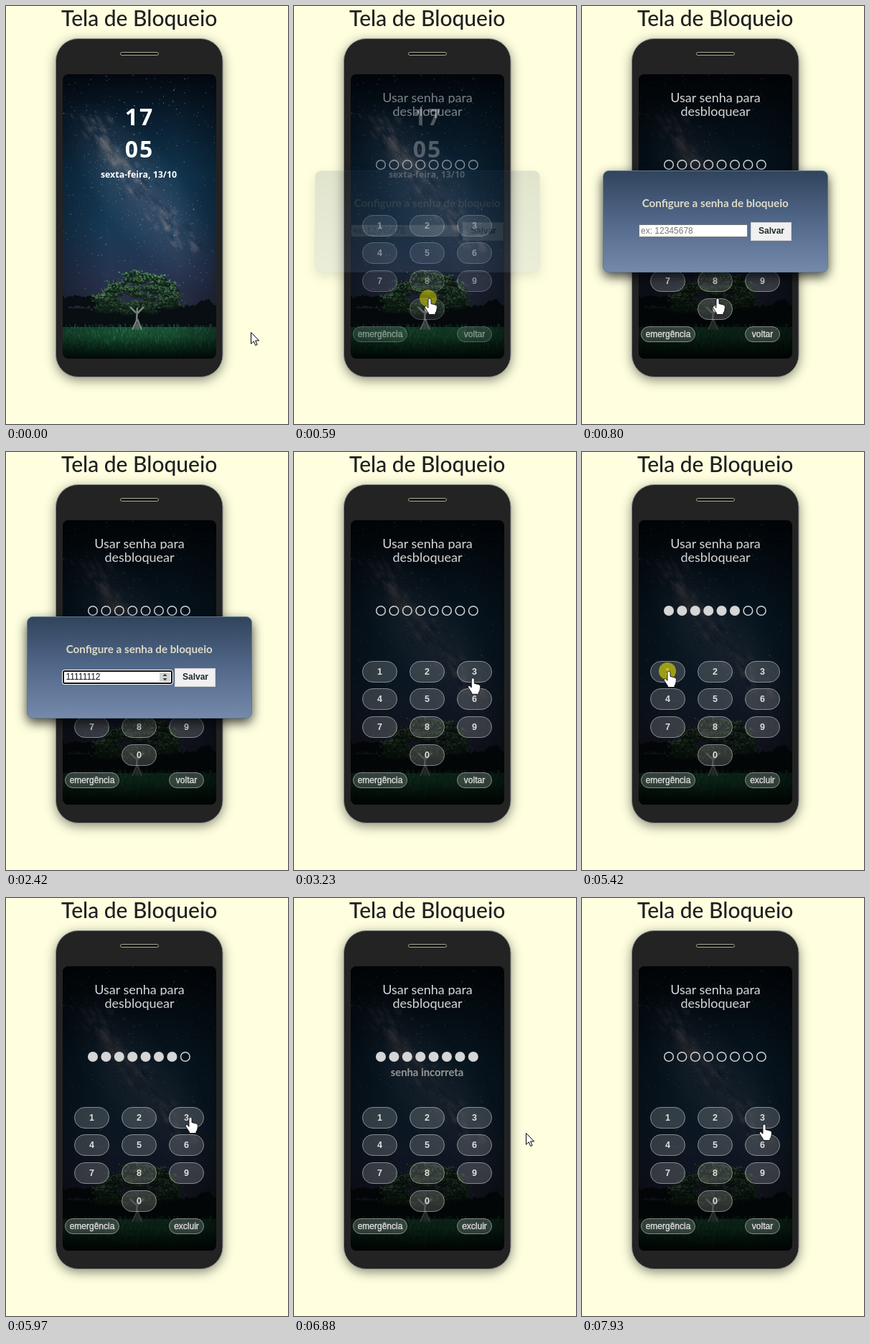
An HTML page with a canvas for the animation above (8000 ms loop, 393 by 582 pixels).

```html
<!DOCTYPE html>
<html lang="pt">
<head>
<meta charset="utf-8">
<title>Tela de Bloqueio</title>
<style>
html, body { margin: 0; width: 100%; height: 100%; overflow: hidden; background: #ffffe0; }
canvas, svg { position: absolute; left: 0; top: 0; }
#photo { left: 79px; top: 95px; border-radius: 8px; }
text { text-anchor: middle; white-space: pre; }
.lato { font-family: Lato, sans-serif; }
.noto { font-family: "Noto Sans", sans-serif; font-weight: 600; fill: #fff; }
.arial { font-family: "Liberation Sans", Arial, sans-serif; }
.bold { font-weight: 700; }
.medium { font-weight: 500; }
.sturdy { stroke: #dedede; stroke-width: .35px; }
.left { text-anchor: start; }
.key { stroke: rgba(255,255,255,.45); }
</style>
</head>
<body>
<svg id="base" width="393" height="582"></svg>
<canvas id="photo" width="214" height="396"></canvas>
<svg id="ui" width="393" height="582"></svg>
<script>
const LOOP = 8000;
const base = document.getElementById('base');
const ui = document.getElementById('ui');

function add(parent, tag, attrs = {}, content) {
  const node = document.createElementNS('http://www.w3.org/2000/svg', tag);
  for (const name in attrs) node.setAttribute(name, attrs[name]);
  if (content !== undefined) node.textContent = content;
  parent.appendChild(node);
  return node;
}
const rect = (parent, x, y, width, height, rx, attrs) =>
  add(parent, 'rect', { x, y, width, height, rx, ...attrs });
const label = (parent, x, y, content, cls, size, fill) =>
  add(parent, 'text', { x, y, class: cls, style: `font-size:${size}px;fill:${fill}` }, content);
const show = (node, on) => { node.style.display = on ? '' : 'none'; };
const ramp = (t, from, to) => Math.min(1, Math.max(0, (t - from) / (to - from)));
const smooth = p => p * p * (3 - 2 * p);

function gradient(parent, id, stops) {
  const g = add(parent, 'linearGradient', { id, x1: 0, y1: 0, x2: 0, y2: 1 });
  stops.forEach((color, i) =>
    add(g, 'stop', { offset: i / (stops.length - 1), 'stop-color': color }));
}

// Phone body
label(base, 185.7, 28, 'Tela de Bloqueio', 'lato medium', 30, '#212121');
rect(base, 69.5, 45.5, 232.5, 471, 31, {
  fill: '#232323', stroke: '#858a86',
  style: 'filter:drop-shadow(0 4px 8px rgba(0,0,0,.45))'
});
rect(base, 159.5, 64.5, 53, 4, 2, { fill: '#151515', stroke: '#aaa993' });

// Night landscape
function paintPhoto() {
  const c = document.getElementById('photo').getContext('2d');
  let seed = 17;
  const rnd = () => (seed = (seed * 16807) % 2147483647) / 2147483647;
  const spread = () => rnd() + rnd() + rnd() - 1.5;
  const fillBox = (style, x, y, w, h) => { c.fillStyle = style; c.fillRect(x, y, w, h); };
  const blend = (g, stops) => { stops.forEach(([p, color]) => g.addColorStop(p, color)); return g; };
  const vertical = (y0, y1, stops) => blend(c.createLinearGradient(0, y0, 0, y1), stops);
  const blob = (x, y, rx, ry, angle, color) => {
    c.fillStyle = color;
    c.beginPath();
    c.ellipse(x, y, rx, ry, angle, 0, 7);
    c.fill();
  };
  c.translate(-79, -95);

  fillBox(vertical(95, 445, [[0, '#03080f'], [.16, '#091c2c'], [.4, '#10354f'],
    [.62, '#183a56'], [.8, '#273450'], [1, '#29283a']]), 79, 95, 214, 396);

  // Milky way: soft glow, then clumps of light and dust
  const glow = (x, y, rx, ry, rgb, alpha) => {
    c.save();
    c.translate(x, y);
    c.rotate(.9);
    c.scale(rx, ry);
    c.fillStyle = blend(c.createRadialGradient(0, 0, 0, 0, 0, 1),
      [[0, `rgba(${rgb},${alpha})`], [1, `rgba(${rgb},0)`]]);
    c.fillRect(-1, -1, 2, 2);
    c.restore();
  };
  glow(190, 262, 160, 60, '105,108,132', .42);
  glow(147, 210, 38, 17, '150,140,120', .3);
  for (let i = 0; i < 130; i++) {
    const k = rnd();
    glow(112 + 140 * k + spread() * 20, 158 + 175 * k + spread() * 16, 4 + rnd() * 11, 2 + rnd() * 5,
      rnd() < .45 ? '12,28,46' : '150,142,148', .24);
  }

  const star = (x, y, light) => {
    const size = rnd() < .08 ? 1.5 : 1;
    fillBox(`rgba(190,210,230,${light})`, x, y, size, size);
  };
  for (let i = 0; i < 900; i++) {
    const k = rnd();
    star(112 + 145 * k + spread() * 45, 158 + 180 * k + spread() * 35, .05 + .4 * rnd() ** 3);
  }
  for (let i = 0; i < 900; i++)
    star(79 + rnd() * 214, 95 + rnd() * 300, .05 + .7 * rnd() ** 4);
  fillBox(blend(c.createLinearGradient(79, 0, 293, 0),
    [[0, 'rgba(0,5,12,.35)'], [.3, 'rgba(0,5,12,0)'], [.75, 'rgba(0,5,12,0)'], [1, 'rgba(0,5,12,.35)']]),
    79, 95, 214, 350);

  // Tree line and meadow
  for (let x = 75; x < 298; x += 3) {
    const top = x < 130 ? 403 : x > 268 && x < 288 ? 408 : 416;
    blob(x, top + 6 + rnd() * 6, 4, 7, 0, '#080e12');
  }
  fillBox('#080e12', 79, 421, 214, 30);
  fillBox(vertical(446, 491, [[0, '#1b5138'], [.3, '#164a2e'], [.6, '#0a2618'], [1, '#020907']]),
    79, 447, 214, 44);
  for (let i = 0; i < 1500; i++) {
    const k = rnd();
    const light = .4 + .9 * rnd();
    fillBox(`rgba(${40 * light | 0},${108 * light | 0},${72 * light | 0},${.7 * (1 - k) ** 1.3})`,
      79 + rnd() * 214, 442 + k * 46, 1, 2 + rnd() * 4);
  }
  fillBox(blend(c.createLinearGradient(79, 0, 293, 0),
    [[0, 'rgba(0,8,8,.3)'], [.35, 'rgba(0,8,8,0)'], [.7, 'rgba(0,8,8,0)'], [1, 'rgba(0,8,8,.4)']]),
    79, 442, 214, 49);

  // Crown built from flat clumps, lit from above
  for (let i = 0; i < 85; i++) {
    const u = rnd() * 2 - 1;
    const k = rnd();
    const cx = 182 + 52 * u;
    const top = 370 + (u < 0 ? 36 : 20) * u * u;
    const cy = top + k * (428 - 8 * Math.abs(u) - top);
    blob(cx, cy + 2, 10, 4, .3 * u, 'rgba(14,32,24,.7)');
    for (let j = 0; j < 20; j++) {
      const dy = spread() * 4;
      const light = (1.1 - .5 * k) * (.65 - dy * .07 + .45 * rnd());
      blob(cx + spread() * 13, cy + dy, .6 + rnd() * 1.3, .5 + rnd() * .7, rnd() - .5,
        `rgb(${72 * light | 0},${118 * light | 0},${74 * light | 0})`);
    }
  }
  c.strokeStyle = '#77837a';
  c.lineWidth = 2.5;
  c.stroke(new Path2D('M183 420l-1 18-6 13M183 436l6 15M183 428l9-9M181 427l-8-8'));
  blob(183, 446, 3, 5, 0, '#55625a');
}
paintPhoto();

// Clock face
const clock = add(ui, 'g');
for (const [y, digits] of [[166, '17'], [211, '05']])
  add(clock, 'text', { x: 186, y, class: 'noto', style: 'font-size:32px;letter-spacing:2px' }, digits);
label(clock, 185, 239, 'sexta-feira, 13/10', 'noto', 12.4, '#fff');

// Keypad
const pad = add(ui, 'g');
const defs = add(ui, 'defs');
gradient(defs, 'panel', ['#31445c', '#52688a', '#758aab']);
rect(pad, 79, 95, 214, 396, 8, { fill: 'rgba(0,0,0,.6)' });
[['Usar senha para', 134, 116], ['desbloquear', 153, 136.5]].forEach(([words, y, top], i) => {
  rect(add(defs, 'clipPath', { id: 'line' + i }), 79, top, 214, 19.5, 0);
  label(pad, 186, y, words, 'lato', 18, '#d6d6d6').setAttribute('clip-path', `url(#line${i})`);
});

const pinRow = add(pad, 'g', { stroke: '#d2d4d5', 'stroke-width': 1.5 });
const pins = Array.from({ length: 8 }, (_, i) =>
  add(pinRow, 'circle', { cx: 121 + i * 18.4, cy: 221, r: 6.3 }));
const wrong = label(pad, 185.5, 248, 'senha incorreta', 'lato bold', 14.8, '#969899');

const IDLE = 'rgba(255,255,255,.17)';
const ACTIVE = 'rgba(255,255,255,.42)';
const keys = [1, 2, 3, 4, 5, 6, 7, 8, 9, 0].map((digit, i) => {
  const x = 95 + 66 * (digit ? i % 3 : 1);
  const y = 291 + Math.floor(38.7 * Math.floor(i / 3));
  const key = rect(pad, x + .5, y + .5, 48, 29, 14.5, { class: 'key', fill: IDLE });
  label(pad, x + 24.5, y + 19, digit, 'arial bold', 12.5, '#dedede');
  return key;
});
const pill = (x, width, content) => {
  rect(pad, x, 446.5, width, 21, 10.5, { class: 'key', fill: IDLE });
  return label(pad, x + width / 2, 461, content, 'arial sturdy', 12, '#dedede');
};
pill(82.5, 75, 'emergência');
const back = pill(227.5, 48, 'voltar');

// Password dialog
const dialog = add(ui, 'g');
rect(dialog, 29.5, 229.5, 313, 141, 8, {
  fill: 'url(#panel)', stroke: '#5e7b97',
  style: 'filter:drop-shadow(0 6px 8px rgba(0,0,0,.75))'
});
label(dialog, 185.7, 280, 'Configure a senha de bloqueio', 'lato bold', 15.2, '#dddcc8');
rect(dialog, 79.5, 304.5, 151, 17, 0, { fill: '#fff', stroke: '#777' });
const focus = add(dialog, 'g');
rect(focus, 78.5, 303.5, 154, 20, 3, { fill: '#fff', stroke: '#fff' });
rect(focus, 80, 305, 151, 17, 2, { fill: '#fff', stroke: '#101010', 'stroke-width': 2 });
rect(focus, 214, 307, 15, 13, 0, { fill: '#d4d4d4' });
add(focus, 'path', { d: 'M218.5 312l3-3.5 3 3.5zM218.5 315l3 3.5 3-3.5z', fill: '#404040' });
const hint = label(dialog, 82, 317, 'ex: 12345678', 'arial left', 12, '#777');
const typed = label(dialog, 83.5, 317, '', 'arial left', 12, '#111');
rect(dialog, 235.5, 301.5, 56, 25, 0, { fill: '#f0f0f0', stroke: '#d2d2d2' });
label(dialog, 264, 317, 'Salvar', 'arial bold', 12, '#1d2b2b');

// Pointer
const flash = add(ui, 'circle', { r: 12, fill: 'rgba(210,205,0,.68)' });
const pointer = add(ui, 'g', { stroke: '#000', 'stroke-linejoin': 'round' });
const shapes = {
  arrow: 'M.5.5v15.8l3.7-3.5 2.5 5.7 2.4-1-2.5-5.6h5z',
  hand: 'M-2 2a2 2 0 0 1 4 0V7.5l6 1.5q2.5.6 2.5 3l-.8 5q-.5 2-1.7 3v2.5h-9q-.8-3-3-5.5l-2.8-4.5q0-2 2-2l2.8 2.8z',
  beam: 'M-3-8h6M0-8v16M-3 8h6'
};
for (const name in shapes)
  shapes[name] = add(pointer, 'path', { d: shapes[name], fill: '#fff', 'stroke-width': name === 'hand' ? .8 : 1 });

const track = [
  [70, 341, 454], [430, 189, 407], [900, 189, 407], [1300, 150, 313], [2480, 150, 313],
  [2740, 253, 315], [3200, 253, 315], [3510, 121, 305], [5640, 121, 305], [5970, 257, 305],
  [6470, 257, 305], [6740, 323, 327], [7700, 323, 327], [7920, 254, 315]
];
const shapeTimes = [
  [0, 'arrow'], [500, 'hand'], [950, 'arrow'], [1150, 'beam'], [1750, ''], [2480, 'beam'],
  [2600, 'arrow'], [2680, 'hand'], [6550, 'arrow'], [7850, 'hand']
];
const presses = [3700, 3900, 4100, 4330, 4590, 5080, 5410, 6270];
const otherClicks = [440, 1350, 2750];
const shake = [0, -1.5, 3, -6, 6, -6, 6, -6, 3, -1.5, 0];

function pointerAt(t) {
  const i = track.findIndex(step => step[0] > t);
  if (i === 0) return track[0].slice(1);
  if (i < 0) return track[track.length - 1].slice(1);
  const [t0, x0, y0] = track[i - 1];
  const [t1, x1, y1] = track[i];
  const p = smooth(ramp(t, t0, t1));
  return [x0 + (x1 - x0) * p, y0 + (y1 - y0) * p];
}

function typedAt(t) {
  if (t < 1750) return '';
  const repeats = t < 2150 ? 0 : Math.min(6, 1 + Math.floor((t - 2150) / 33));
  return '1'.repeat(1 + repeats) + (t < 2400 ? '' : '2');
}

function render(t) {
  const padIn = ramp(t, 480, 680);
  clock.style.opacity = 1 - padIn;
  pad.style.opacity = padIn;
  dialog.style.opacity = ramp(t, 560, 780);
  show(dialog, t > 560 && t < 2950);
  show(focus, t >= 1350 && t < 2820);
  show(hint, t < 1750);
  typed.textContent = typedAt(t);

  const cleared = t >= 7720;
  const filled = cleared ? 0 : presses.filter(p => t >= p + 140).length;
  pins.forEach((pin, i) => pin.setAttribute('fill', i < filled ? '#d6d6d6' : 'none'));
  back.textContent = filled ? 'excluir' : 'voltar';
  wrong.style.opacity = cleared ? 0 : ramp(t, 6450, 6740);

  const s = ramp(t, 6880, 7700) * 10;
  const n = Math.min(9, Math.floor(s));
  const shift = shake[n] + (shake[n + 1] - shake[n]) * smooth(s - n);
  pinRow.setAttribute('transform', `translate(${shift})`);

  const active = presses.findIndex(p => t >= p + 70 && t < p + 140);
  keys[0].setAttribute('fill', active >= 0 && active < 7 ? ACTIVE : IDLE);
  keys[2].setAttribute('fill', active === 7 ? ACTIVE : IDLE);

  const [x, y] = pointerAt(t);
  pointer.setAttribute('transform', `translate(${x} ${y})`);
  const shape = shapeTimes.filter(step => step[0] <= t).pop()[1];
  for (const name in shapes) show(shapes[name], name === shape);
  const click = [...presses, ...otherClicks].find(p => t >= p && t < p + 200);
  show(flash, click !== undefined);
  if (click !== undefined) {
    flash.setAttribute('cx', x - 2);
    flash.setAttribute('cy', y);
    flash.style.opacity = 1 - ramp(t, click + 140, click + 200);
  }
}

const start = performance.now();
function tick() {
  render((performance.now() - start) % LOOP);
  requestAnimationFrame(tick);
}
tick();
</script>
</body>
</html>
```
